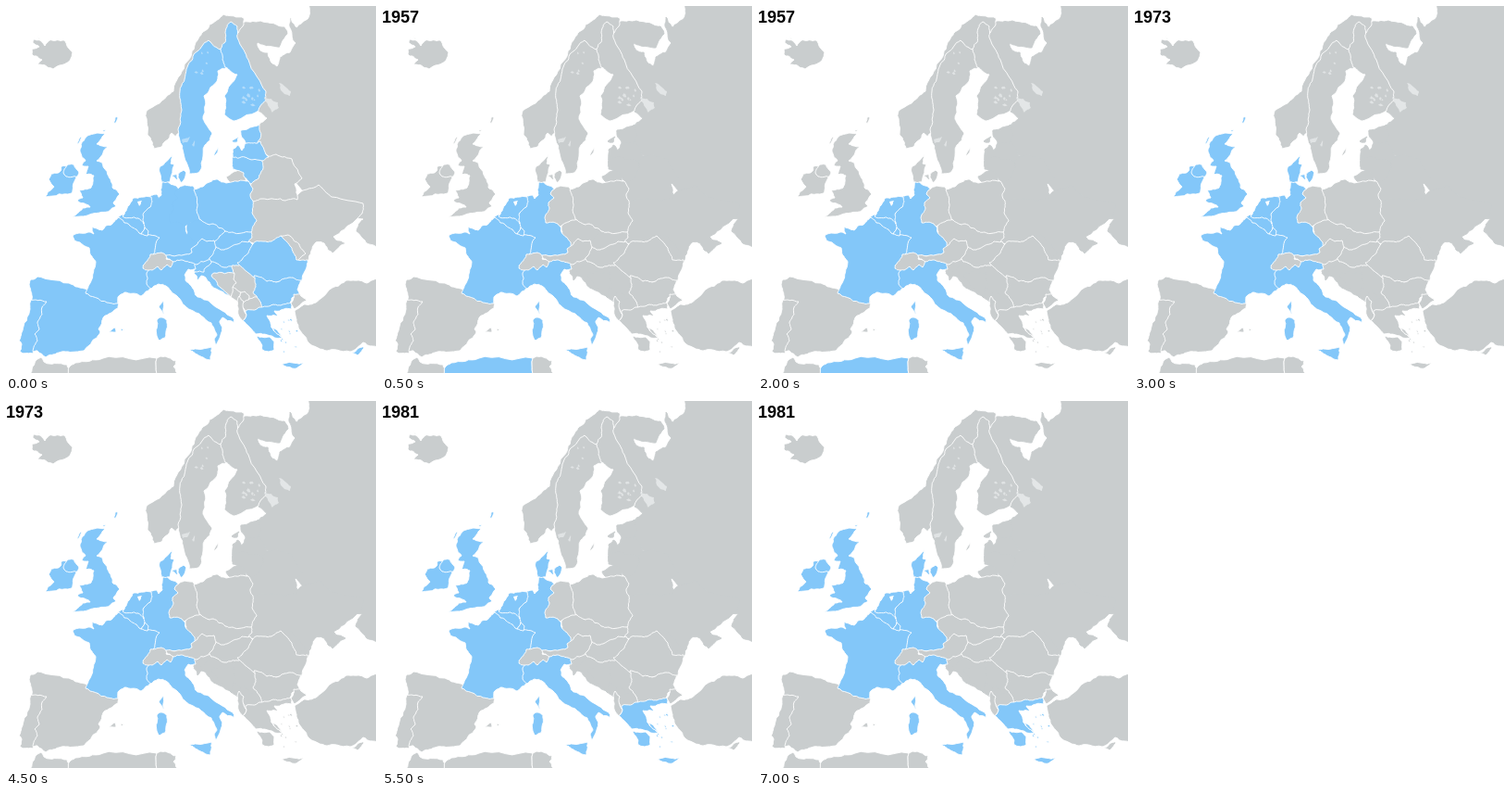
An HTML page that plays this animation: 400 px wide and 396 px high, repeating every 8000 ms.

```html
<!DOCTYPE html>
<html lang="en">
<head>
<meta charset="utf-8">
<title>Map of members by year</title>
<style>
  :root { --land: #c9cdce; --member: #83c7f9; }
  html, body { margin: 0; width: 100%; height: 100%; overflow: hidden; background: #fff; }
  svg { display: block; width: 400px; height: 396px; }
  path { fill: var(--land); stroke: #fff; stroke-width: .9; stroke-linejoin: round; }
  path, text { animation: 8s step-end infinite; }
  text { font: bold 18px "Liberation Sans", Arial, sans-serif; opacity: 0; }
  .lake { stroke: none; fill: #e3e6e7; }
  .sea { stroke: none; fill: #fff; }

  /* fills, by date of joining */
  @keyframes core { 0%, 100% { fill: var(--member); } }
  @keyframes north { 0% { fill: var(--member); } 6.25% { fill: var(--land); } 37.5%, 100% { fill: var(--member); } }
  @keyframes south { 0% { fill: var(--member); } 6.25% { fill: var(--land); } 68.75%, 100% { fill: var(--member); } }
  @keyframes late { 0% { fill: var(--member); } 6.25%, 100% { fill: var(--land); } }
  @keyframes colony { 0% { fill: var(--land); } 6.25% { fill: var(--member); } 37.5%, 100% { fill: var(--land); } }
  @keyframes water { 0% { fill: #b4dcfa; } 6.25%, 100% { fill: #e0e3e4; } }

  /* borders that exist only now, or only then */
  @keyframes union { 0% { stroke: #fff; } 6.25%, 100% { stroke: var(--land); } }
  @keyframes split { 0% { stroke: var(--member); } 6.25%, 100% { stroke: #fff; } }

  @keyframes y1957 { 0% { opacity: 0; } 6.25% { opacity: 1; } 37.5%, 100% { opacity: 0; } }
  @keyframes y1973 { 0% { opacity: 0; } 37.5% { opacity: 1; } 68.75%, 100% { opacity: 0; } }
  @keyframes y1981 { 0% { opacity: 0; } 68.75%, 100% { opacity: 1; } }
</style>
</head>
<body>
<svg viewBox="0 0 400 396">
  <g id="lands"></g>
  <text x="0" y="18" style="animation-name:y1957">1957</text>
  <text x="0" y="18" style="animation-name:y1973">1973</text>
  <text x="0" y="18" style="animation-name:y1981">1981</text>
</svg>
<script>
const lands = document.getElementById('lands');

const noise = (x, y) => {
  const v = Math.sin(x * 12.9898 + y * 78.233) * 43758.5453;
  return v - Math.floor(v) - .5;
};

// Midpoint displacement gives the ragged coasts.
function edge(a, b, depth) {
  const len = Math.hypot(b[0] - a[0], b[1] - a[1]);
  if (!depth || len < 2.5) return [b];
  const x = (a[0] + b[0]) / 2, y = (a[1] + b[1]) / 2, k = Math.min(len, 12) * .24;
  const m = [x + noise(x, y) * k, y + noise(y, x) * k];
  return [...edge(a, m, depth - 1), ...edge(m, b, depth - 1)];
}

function outline(text) {
  const pts = text.split(' ').map(p => p.split(',').map(Number));
  const all = pts.flatMap((p, i) => edge(p, pts[(i + 1) % pts.length], 3));
  return 'M' + all.map(p => p.map(n => n.toFixed(1))).join('L') + 'Z';
}

function draw(anim, d, cls = '') {
  const path = document.createElementNS('http://www.w3.org/2000/svg', 'path');
  path.setAttribute('d', d);
  path.setAttribute('class', cls);
  if (anim) path.style.animationName = anim;
  lands.append(path);
}

const land = (anim, shapes, cls) => draw(anim, shapes.split('/').map(outline).join(''), cls);

// Small blobs strewn over an ellipse
function strew(anim, count, cx, cy, rx, ry, size, cls) {
  let d = '';
  for (let i = 1; i <= count; i++) {
    const x = cx + noise(i, cx) * 2 * rx, y = cy + noise(cy, i) * 2 * ry;
    const w = size * (1 + noise(i, i)), h = size * (1 + noise(x, i)) * .8;
    d += `M${x - w} ${y}L${x} ${y - h}L${x + w} ${y + h / 2}L${x} ${y + h}Z`;
  }
  draw(anim, d, cls);
}

// Each land covers part of those before it, so a border is given only once.

// East
land('union', '258,17 275,16 301,22 305,30 296,45 272,40 275,48 283,50 287,61 293,65 296,55 307,50 313,40 306,22 307,12 314,23 326,14 328,-4 406,-4 406,264 390,256 378,243 386,230 340,215 290,170 270,150 270,130 282,121 273,114 255,70 245,24');
land('union', '262,205 313,206 318,201 338,193 352,206 386,213 385,224 378,231 354,249 367,256 353,267 344,256 335,255 326,276 310,276 280,262 258,252');
land('union', '297,248 305,247 317,257 324,267 316,275 305,270');
land('union', '262,211 276,208 302,210 315,209 312,192 320,186 309,165 292,160 280,163 268,180 262,200');
land('union', '238,184 246,179 258,178 260,192 243,192');
land('late, union', '245,160 270,158 276,166 278,173 273,186 264,192 257,184 257,180 245,176');
land('late, union', '245,163 245,155 250,150 255,156 262,145 275,146 284,163 277,167 258,163');
land('late, union', '254,134 274,128 275,143 272,148 259,148 254,139/244,146 252,141 250,147');

// Balkans
land('late, union', '222,274 245,277 247,292 235,300 244,315 227,305 217,295 211,291 207,296 203,288');
land('late, union', '203,287 203,275 222,272 222,277 215,283 214,287');
land('union', '222,291 225,288 250,289 250,305 243,314 232,304');
land('union', '245,303 249,299 246,295 247,289 243,277 255,274 272,295 272,315 258,318');
land('union', '245,303 254,309 250,319 243,314');
land('union', '254,309 258,308 263,313 262,320 256,322 252,314');
land('union', '254,321 262,317 272,313 278,326 259,331');

// Middle
land('late', '228,246 240,236 265,243 266,250 262,255 250,262 235,266 222,262');
land('late, union', '196,234 210,226 236,236 237,243 231,248 225,255 204,260 195,250');
land('core, split', '156,206 163,204 165,208 169,204 168,198 170,187 184,195 190,205 186,225 193,238 194,244 204,255 206,262 196,272 165,270 155,264 150,245 146,228 154,210');
land('late, split', '184,199 193,194 202,195 208,205 211,218 212,230 206,231 193,238 190,235 177,234 176,228 181,218 180,212 186,207 182,203');

// West
land('late', '88,306 121,317 121,326 106,335 100,349 102,352 90,366 84,372 57,374 43,379 34,372 28,373 28,316 25,300 27,295 34,292 68,299/111,352 118,347 119,352/124,348 128,349 125,351');
land('late', '27,317 44,319 39,325 39,333 34,341 36,349 31,354 34,361 29,375 15,373 17,365 14,361 18,350 26,327');
land('core', '121,228 114,236 107,238 104,242 93,238 95,246 79,245 72,248 74,253 90,261 97,276 91,299 86,310 109,320 121,321 121,314 128,309 146,313 157,304 158,290 155,278 160,267 166,250 152,247 148,240 130,228/170,318 171,333 165,324');
land('core', '121,228 126,225 146,228 150,239 146,246 141,241 132,235 128,234');
land('core', '126,227 130,221 138,207 157,206 158,211 156,217 148,225 149,235 143,229');
land('', '142,211 147,210 144,216', 'sea');
land('core', '150,239 154,243 153,248 146,246');
land('core', '157,305 152,300 153,293 152,288 156,279 190,272 204,277 205,284 197,284 193,290 194,296 201,303 207,314 222,321 245,336 247,342 234,336 231,340 234,347 227,366 225,360 228,355 222,342 200,328 185,313 173,302 165,300');
land('core', '198,371 222,368 221,382 207,376/163,339 169,336 174,339 172,358 166,361 163,356');
land('', '148,280 156,268 168,266 174,270 173,273 181,275 178,282 174,279 168,285 164,281 158,285 148,283');

// Centre
land('late', '222,262 227,260 232,263 239,262 255,254 264,254 268,262 252,280 236,282 222,276 218,268');
land('late', '173,269 194,268 201,266 200,262 212,251 217,254 225,253 227,260 222,270 219,274 205,279 189,274 181,276 174,272');
land('late', '205,203 203,198 220,190 229,187 238,191 262,189 267,197 264,203 267,210 266,223 271,232 265,244 245,244 237,243 224,235 220,236 209,230 206,220 207,214');

// South-east
land('late', '250,277 255,274 266,258 270,254 287,254 297,248 309,261 314,274 326,274 321,290 318,298 274,299 262,288');
land('late', '268,291 282,297 292,298 301,294 310,293 319,296 315,306 318,311 309,315 308,324 276,327 275,319 267,309 270,303');
land('', '250,318 252,313 257,319 256,324 260,333 256,340 252,335');
land('south', '256,340 260,333 259,329 274,325 289,322 297,323 309,320 309,327 290,329 294,334 282,334 287,347 299,358 289,357 270,354 262,345');
land('south', '271,356 285,357 290,362 290,371 284,373 277,371/289,347 299,357 293,354/298,387 322,385 314,391');
strew('south', 14, 308, 355, 12, 18, 1.7);
land('', '311,311 318,311 325,318 312,327 308,321/312,329 322,322 335,320 355,303 368,296 390,299 406,291 406,370 386,363 372,373 347,372 326,362 316,347');
land('late', '374,374 387,368 380,377');

// Africa
land('', '24,400 34,381 38,379 41,384 66,387 72,400');
land('colony', '68,400 68,390 75,385 105,380 163,380 163,400');
land('', '163,380 172,378 184,383 181,389 187,400 163,400');

// Islands of the north-west
land('', '28,47 36,44 29,40 30,36 37,37 34,31 42,43 47,37 63,37 72,50 70,57 51,68 34,63 39,58 28,52');
land('north', '60,173 73,171 76,185 71,202 43,206 52,195 46,187 49,181 58,179');
land('north', '67,171 73,171 79,180 77,184 65,184 62,180');
land('north', '91,139 107,138 98,149 110,152 98,167 104,169 113,187 115,196 123,203 116,213 119,216 113,220 94,224 71,228 83,218 91,217 77,210 83,207 79,199 92,196 95,183 86,181 89,173 82,172 86,167 80,157 82,147');
land('north', '79,143 82,141 76,152/104,134 108,133 106,136/118,120 121,120 117,127');

// Scandinavia
land('north', '168,190 166,174 180,159 178,170 182,171 177,190/179,183 185,182 185,188/186,181 192,177 195,180 190,191');
land('', '183,141 179,137 168,152 160,154 153,139 152,113 174,97 181,92 193,63 207,37 220,20 235,9 257,13 257,20 245,35 225,60 195,110 190,135');
land('late', '240,66 240,50 228,45 219,37 203,52 195,68 188,92 190,112 186,133 191,155 198,181 209,179 215,150 223,138 213,122 214,97 229,78 229,70/225,162 229,152 228,159');
land('late', '237,66 234,58 232,46 237,39 238,24 243,17 250,22 250,34 262,58 281,92 281,102 273,113 247,124 236,117 236,97 247,80 250,74');

// Lakes
land('water', '190,144 199,141 196,147 191,148/201,150 204,145 203,152', 'lake');
strew('water', 16, 265, 97, 9, 10, 2, 'lake');
strew('water', 6, 212, 62, 9, 12, 1.6, 'lake');
land('', '279,98 294,104 295,110 288,115/295,83 308,92 307,97 301,95', 'lake');
</script>
</body>
</html>
```
